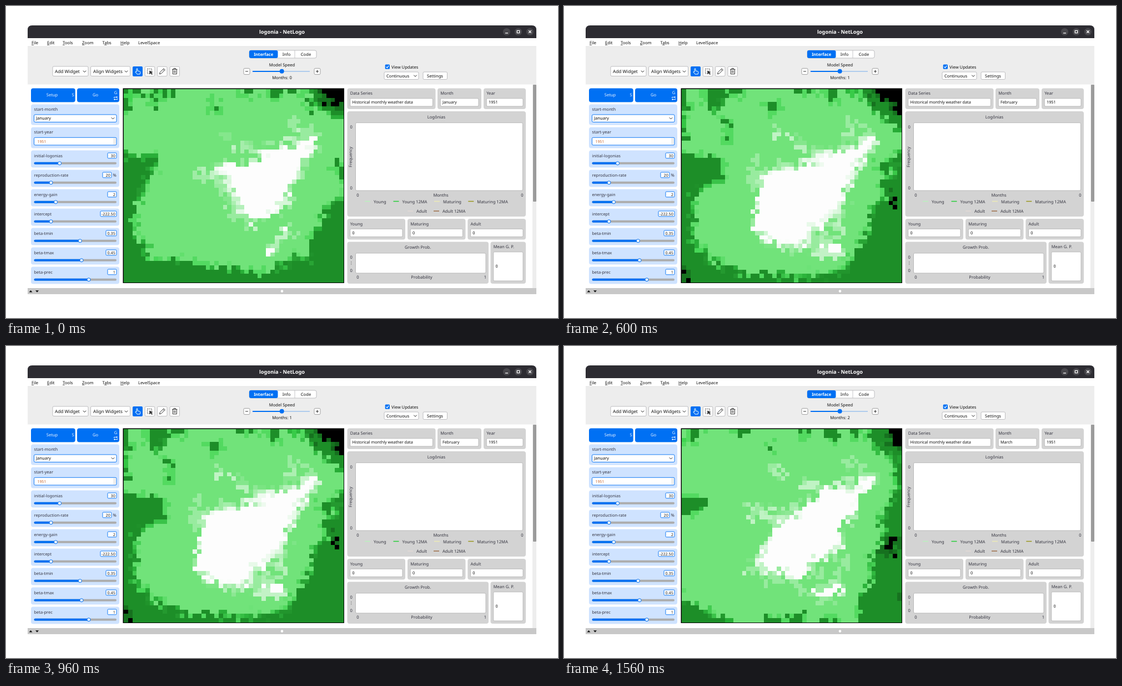
Write an HTML page with a canvas that moves like this. It is 994 px wide and 563 px high and loops after 1800 ms.

```html
<!DOCTYPE html>
<html lang="en">
<head>
<meta charset="utf-8">
<title>logonia</title>
<style>
  html, body { margin: 0; width: 100%; height: 100%; overflow: hidden; background: #fff; }
  svg { position: absolute; left: 0; top: 0; }
  text { font: 7.6px "Noto Sans", sans-serif; fill: #353540; text-rendering: geometricPrecision; white-space: pre; }
  #map { position: absolute; left: 212px; top: 150px; width: 396px; height: 349px; image-rendering: pixelated; }
</style>
</head>
<body>
<svg id="ui" width="994" height="563"></svg>
<canvas id="map" width="51" height="45"></canvas>
<script>
const BLUE = '#0070f3', GREY = '#d3d3d3', SKY = '#cfe3ff', INK = '#111';
const parts = [];
const add = markup => parts.push(markup);

// Boxes are given by their edges: left, top, right, bottom.
const box = (l, t, r, b, fill = '#fff', stroke = 'none', radius = 2) =>
  add(`<rect x="${l}" y="${t}" width="${r - l}" height="${b - t}" rx="${radius}" fill="${fill}" stroke="${stroke}" stroke-width=".9"/>`);
const path = (d, stroke, width = 1, fill = 'none', extra = '') =>
  add(`<path d="${d}" stroke="${stroke}" stroke-width="${width}" fill="${fill}" ${extra}/>`);
const circle = (x, y, r, fill, stroke = 'none') =>
  add(`<circle cx="${x}" cy="${y}" r="${r}" fill="${fill}" stroke="${stroke}"/>`);
const text = (x, y, s, { anchor = 'start', style = '', attrs = '' } = {}) =>
  add(`<text x="${x}" y="${y}" text-anchor="${anchor}" style="${style}" ${attrs}>${s}</text>`);
const centred = (x, y, s, style, attrs) => text(x, y, s, { anchor: 'middle', style, attrs });
const chevron = (x, y) => path(`M${x - 2.7} ${y - 1.3}l2.7 2.7 2.7-2.7`, '#222');

function drawWindow() {
  path('M39 520V43q0-8 8-8H947q8 0 8 8V520z', 'none', 0, '#fff');
  path('M39 58V43q0-8 8-8H947q8 0 8 8V58z', 'none', 0, '#2d2c32');
  centred(497, 49.8, 'logonia - NetLogo', 'font-size:9.25px;font-weight:bold;fill:#fff');
  for (const x of [901.5, 922.5, 943.5]) circle(x, 46.5, 6.6, '#48474c');
  path('M899 48.8h5M920.3 44.3h4.4v4.4h-4.4zM941.2 44.2l4.6 4.6m0-4.6l-4.6 4.6', '#fff', 1.3);
  const menu = [[46, '', 'F', 'ile'], [74, '', 'E', 'dit'], [102, '', 'T', 'ools'], [137, '', 'Z', 'oom'],
    [173.5, 'T', 'a', 'bs'], [206, '', 'H', 'elp'], [238, '', '', 'LevelSpace']];
  for (const [x, before, key, after] of menu)
    text(x, 68.8, `${before}<tspan text-decoration="underline">${key}</tspan>${after}`, { style: `fill:${INK}` });
  box(39, 73, 955, 141.5, '#ededed', 'none', 0);
  path('M39 73h916', '#ddd', .8);
  box(948, 141.5, 955, 509, '#ededed', 'none', 0);
  box(949, 142, 955, 353, '#9b9b9b', 'none', 1);
  box(39, 509, 955, 520, '#c8c8c8', 'none', 0);
  path('M41.5 516.5l3-3.5 3 3.5zM53 513.2h6l-3 3.5z', 'none', 0, '#111');
  circle(497, 514.6, 2.3, '#fff');
}

function drawToolbar() {
  const dark = `fill:${INK}`, line = '#b8b8bc';
  box(438, 80, 559, 94, '#fff', line, 3);
  box(438, 80, 489.5, 94, BLUE, 'none', 3);
  path('M520 80v14', line, .8);
  centred(463.7, 89.6, 'Interface', 'fill:#fff;font-weight:bold');
  centred(505, 89.6, 'Info', dark);
  centred(540, 89.6, 'Code', dark);

  const wide = 'font-size:8.2px;fill:#111';
  box(84, 109, 148, 126.5, '#fff', line);
  text(88, 120.8, 'Add Widget', { style: wide });
  chevron(141.5, 118);
  box(152.5, 109, 223.5, 126.5, '#fff', line);
  text(157, 120.8, 'Align Widgets', { style: wide });
  chevron(216.5, 118);

  box(228, 109, 246, 127, BLUE);
  for (const x of [250.3, 272.5, 295]) box(x, 109.3, x + 17.5, 126.7, '#fff', line);
  path('M235 119v-5.5q1-1.5 2 0v3.5l4 1q1 .3.9 1.5l-.7 3.5h-5.2l-3.2-4q.6-1.5 2.2 0z', '#fff');
  path('M254.5 113.5h8v4m-3.5 4.5h-4.5v-8.5', '#444', 1, 'none', 'stroke-dasharray="1.8 1.3"');
  path('M258.5 117l5.5 2.2-2.3 1 2 2.6-1.2.9-1.9-2.7-1.7 1.7z', '#333', .7, '#333');
  path('M276.5 122.8l.8-3.2 6.7-6.7 2.3 2.3-6.7 6.7zM282.5 114.3l2.3 2.3', '#333');
  path('M299 114.3h9.5m-6.5 0v-1.6h3.5v1.6m-5.3 0v8.5h7.2v-8.5m-4.7 2v4.5m2.2-4.5v4.5', '#333');

  centred(497, 109, 'Model Speed', dark);
  path('M497 118h50', '#9cc2ee', 1.4);
  path('M444 118h53', BLUE, 1.8);
  circle(496.7, 117.8, 4, BLUE);
  box(428, 112.5, 439, 123.5, '#fff', '#999');
  box(555, 112.5, 566, 123.5, '#fff', '#999');
  path('M431 118h5M558 118h5m-2.5-2.5v5', '#333');
  centred(497, 132, 'Months: 0', dark, 'id="months"');

  box(682.7, 105.5, 691, 113.8, BLUE, 'none', 1.5);
  path('M684.5 109.7l1.8 1.8 3-3.8', '#fff', 1.2);
  text(694, 112.5, 'View Updates', { style: dark });
  box(681, 119, 743, 132.5, '#fff', line);
  text(685, 128.6, 'Continuous', { style: dark });
  chevron(737, 126);
  box(751, 119, 794.5, 132.5, '#fff', line);
  centred(772.5, 128.6, 'Settings', dark);
}

function drawControls() {
  const pale = 'fill:#e6f1ff';
  box(45, 148.5, 124.7, 173.5, BLUE, 'none', 4);
  box(128, 148.5, 204, 173.5, BLUE, 'none', 4);
  centred(83, 163.3, 'Setup', pale);
  centred(161, 163.3, 'Go', pale);
  centred(120.5, 163.3, 'S', pale);
  centred(197.5, 159, 'G', pale);
  path('M194.5 166v-1.5h6m-1.5-1.5l1.5 1.5-1.5 1.5M200.5 167v1.5h-6m1.5-1.5l-1.5 1.5 1.5 1.5', '#fff', .9);

  box(45, 177.5, 204, 214.7, SKY, 'none', 4);
  text(50.5, 188.8, 'start-month');
  box(50.5, 196, 199, 209.5, '#fff', BLUE);
  text(54, 205.4, 'January', { style: `fill:${INK}` });
  chevron(192.5, 202.6);

  box(45, 218.7, 204, 256.5, SKY, 'none', 4);
  text(50.5, 230, 'start-year');
  box(50.5, 237.3, 199, 251, '#fff', BLUE);
  box(193, 238.5, 198, 250, '#eee', 'none', 1);
  text(56.5, 246.8, '1951', { style: 'font-size:6.8px;fill:#c5622a' });

  const sliders = [['initial-logonias', '30', 183, 96.5], ['reproduction-rate', '20', 174, 81], ['energy-gain', '2', 183, 89.5],
    ['intercept', '-222.50', 170, 81], ['beta-tmin', '0.35', 180, 133.3], ['beta-tmax', '0.45', 180, 136], ['beta-prec', '1', 183, 149]];
  sliders.forEach(([name, value, left, knob], i) => {
    const y = 260.5 + 35 * i, right = i === 1 ? 190 : 199;
    box(45, y, 204, y + 31, SKY, 'none', 4);
    text(50.5, y + 12, name, { style: 'font-size:7.45px' });
    box(left, y + 4.5, right, y + 14.3, '#fff', BLUE, 1.5);
    text(right - 2.2, y + 12, value, { anchor: 'end', style: 'font-size:7.2px;fill:#222' });
    if (i === 1) text(192.5, y + 12, '%');
    box(50.5, y + 21.3, 199, y + 25.2, '#adadad');
    box(50.5, y + 21.3, knob, y + 25.2, BLUE);
    circle(knob, y + 23.3, 3, '#fff', BLUE);
  });
}

function drawMonitor(l, t, r, b, label, value, id = '') {
  box(l, t, r, b, GREY, 'none', 4);
  text(l + 5.2, t + 11.6, label);
  box(l + 5.2, t + 18.3, r - 5, b - 5, '#fff', '#b5b5b5');
  text(l + 9, (t + b + 13.3) / 2 + 2.5, value, { style: 'font-size:7.25px;fill:#111', attrs: id && `id="${id}"` });
}

function drawOutputs() {
  drawMonitor(614.5, 148.5, 773.5, 186, 'Data Series', 'Historical monthly weather data');
  drawMonitor(777, 148.5, 856, 186, 'Month', 'January', 'month');
  drawMonitor(860, 148.5, 936, 186, 'Year', '1951');
  drawMonitor(614.5, 384, 719, 421.5, 'Young', '0');
  drawMonitor(723, 384, 827.5, 421.5, 'Maturing', '0');
  drawMonitor(831.3, 384, 936, 421.5, 'Adult', '0');
  drawMonitor(872.5, 425.5, 936, 501, 'Mean G. P.', '0');

  box(614.5, 190, 936, 380, GREY, 'none', 4);
  centred(775, 203, 'Logônias');
  box(629.5, 210.7, 930.5, 333, '#fff', '#b5b5b5');
  centred(621.7, 220.5, '0');
  centred(621.7, 330.8, '0');
  centred(0, 0, 'Frequency', '', 'transform="translate(623 272.5) rotate(-90)"');
  centred(633.3, 343.6, '0');
  centred(783, 343.6, 'Months');
  centred(929.5, 343.6, '0');
  const legend = [[646, 352.5, '#b9f0bd', 'Young'], [697.5, 352.5, '#24cc37', 'Young 12MA'], [771, 352.5, '#ecebb4', 'Maturing'],
    [832.3, 352.5, '#98951c', 'Maturing 12MA'], [723, 370, '#e2dad5', 'Adult'], [770, 370, '#9d6e48', 'Adult 12MA']];
  for (const [x, y, colour, label] of legend) {
    path(`M${x} ${y}h10`, colour, 1.5);
    text(x + 16, y + 3, label);
  }

  box(614.5, 425.5, 869, 501, GREY, 'none', 4);
  centred(741.7, 438.3, 'Growth Prob.');
  box(629.5, 446, 864, 482, '#fff', '#b5b5b5');
  centred(621.7, 456, '0');
  centred(621.7, 479.6, '0');
  path('M621.7 461v6', '#555', 1, 'none', 'stroke-dasharray="1 1.4"');
  centred(633.3, 492.4, '0');
  centred(748.5, 492.4, 'Probability');
  centred(863, 492.4, '1');
  box(210.5, 148.5, 609, 500, '#000', 'none', 0);
}

drawWindow();
drawToolbar();
drawControls();
drawOutputs();
document.getElementById('ui').innerHTML = parts.join('');

// Land regions, in patches; wisps are stroked, the others filled.
const months = [
  { name: 'January',
    wisps: 'M25 13l3 1 4 .5M24 10.5v1M39 7v2M42 8v3M41 9l-3 3M17 17v2l3 .5M18 20l5 1M21 22h4M22 24h3M24 26l2 1M25 29h2M39 32l-3 3-2 3M36 34l2-1M38 25v2M29 12v1',
    snow: 'M45.8 11 43 11 42 12 39 13 36 14 32.6 14 32 16 30 17 29 18 24 18 20.6 18.3 21 19.3 24 20 25 21 24.5 23 25.8 24 25 25 27 26 26.5 28 28 29 30 29 29 31 29 32 30 32 31 30 33 30 36 28.5 36.5 26 38 25 38 22 40 21 42 18 42 15.2 43.5 14.4 44 13zM33 37h3v1h-3zM38 32h1v1h-1z',
    forest: 'M0 0H4V1H1V5L0 7zM7 0h1v4H7zM9 0h2v1H9zM20 3h2v2h-2zM27 0h2v1h-2zM33 0h3v2h-3zM39 0h2v1h-2zM43 0 51 0 51 6.5 48 6.5 45 4 44 2zM0 15.5H8V17L7 18 6 20 5 22 4 24 3 27 2 28 2 32 3 35 5 37 6 40 13 40 15 41 20 41 21 42 24 42 26 41 28 43 34 43 37 41 40 39 42 40 44 37 44 33 46 31 47 27 51 25V45H0zM48 18h1v1h-1zM50 17h1v3h-1zM43 3h1v2h-1z',
    rock: 'M46 0H51V4H49V3H47V1H46z' },
  { name: 'February',
    wisps: 'M21 9h3M22.5 8v3M24 10l2 2 4 2M26 13l6 1.5M39 7v2M42 8v1M41 10l-4 2M15 20h5M17 16v3M16 22h3M21 18h5M38 26l-2 3M35 30l3 4M37 29l-2 6M33 31v6M30 35h4M24 38l5-.5M40 19v3',
    snow: 'M45 11 43 11 42 12.5 38 14 32.5 14.5 32 16 29 17 27 18 25 18 23 19 20 19 19 21 19 23 17 25 18 27 17 29 17 33 19 33.5 19 35.5 24 36 27 37 29 36 30 33 32 32 33 30 36 29 37 25 38.5 22 40 20 41 18 42 15.7 44 13.5zM31 37h6v1.3h-6zM35 36h2v1h-2z',
    forest: 'M0 0H1V5L0 8zM6 0 10 0 10 2 8 5 6 4zM10 7h1v6h-1zM0 9h1v3h-1zM12 0h2v1h-2zM20 3h2v2h-2zM27 0h2v1h-2zM33 0h3v2h-3zM38 0 51 0 51 10 48 7 45 5 43 3 42 1zM0 15 2 15 3 16 9 16 9 20 8 22 5.5 22 4 24 2 26 3 31 2 34 3 37 5.5 37 6 40 9 41 12 42 15 43 20 43 25 44 33 43 38 42 39 40 41 37 43 34 44 30 45 27 47 25 47 21 50 20 49 17 51 14V45H0zM46 17h2v2h-2z',
    rock: 'M45 0H51V5H50V4H48V2H45zM49 25h1v2h-1zM0 43h2v1H0z' },
  { name: 'March',
    wisps: 'M20 9h3M22 8v2l2 1M26 13.5h6M28 12l3 1M39 7v2M42 8v2M40 11l-3 2M15 18l12 1M15 20.5h9M17 17v4M20 22h3M13 33.5h6M17 31v2M18 34l3 1M19 35h4M27 36v3M30 34h3M36 33v4M39 20v2M35 31h3',
    snow: 'M45 11 43 11 42 12 38 13.5 32 14 32 16 29 17.4 27.5 18 27 20 24 21 22 22.5 21.6 24.5 19.7 26 20 27 18.5 28.6 17 31 18 32 20 33 24 33 26 35 28 35 30 32 30.5 30 33 30 36 28.4 37 26 36.5 22.6 38 21 40 19.6 41 17.4 42 15 44 13zM31 37 35 37 35 36 37 36 37 38 34 39 31 39z',
    forest: 'M2 0H5V1L3 3H2zM0 2h1v1H0zM13 0h2v1h-2zM20 3h1v1h-1zM27 0h2v2h-2zM33 0h3v2h-3zM39 0h3v1h-3zM43 0 51 0 51 8 48 6 45 4 44 2zM0 16H5L6 17 4 19H0zM49 9h2v2h-2zM51 13 51 45 41 45 41 39 44 36 45 32 44 30 46 27 47 24 46 22 48 18 49 16zM0 39 3 40 4 42 7 43 9 44 12 45 0 45zM20 44h3v1h-3zM25 43h3v2h-3zM33 44h3v1h-3zM50 11h1v2h-1z',
    rock: 'M48 0H51V4H49V2H48zM47 27h2v2h-2zM49 25h1v2h-1zM50 38h1v1h-1z' }
];

const map = document.getElementById('map').getContext('2d', { willReadFrequently: true });
const W = 51, H = 45;

function makeTerrain({ wisps, snow, forest, rock }, seed) {
  const random = () => (seed = seed * 16807 % 2147483647) / 2147483647;
  const region = (d, fill, edge) => {
    const shape = new Path2D(d);
    map.lineWidth = .8;
    map.strokeStyle = edge;
    map.stroke(shape);
    map.fillStyle = fill;
    map.fill(shape);
  };
  map.fillStyle = '#71e37a';
  map.fillRect(0, 0, W, H);
  map.lineWidth = 1;
  map.strokeStyle = '#c0f3c4';
  map.stroke(new Path2D(wisps));
  region(snow, '#fdfdfd', '#d2f6d5');
  region(forest, '#1d8e28', '#28cc3b');
  region(rock, '#000', '#0e4714');

  // Ragged borders: some patches copy a neighbour.
  const smooth = map.getImageData(0, 0, W, H), ragged = map.createImageData(W, H);
  const near = (value, limit) => Math.min(limit - 1, Math.max(0, value + Math.round((random() - .5) * 1.7)));
  for (let y = 0; y < H; y++) for (let x = 0; x < W; x++) {
    const from = 4 * (near(y, H) * W + near(x, W));
    ragged.data.set(smooth.data.subarray(from, from + 4), 4 * (y * W + x));
  }
  return ragged;
}

const terrains = months.map((month, i) => makeTerrain(month, 4211 + i));
const monthsLabel = document.getElementById('months'), monthLabel = document.getElementById('month');
let shown = -1;

function tick() {
  const current = Math.floor(performance.now() % 1800 / 600);
  if (current !== shown) {
    shown = current;
    map.putImageData(terrains[current], 0, 0);
    monthsLabel.textContent = `Months: ${current}`;
    monthLabel.textContent = months[current].name;
  }
  requestAnimationFrame(tick);
}
tick();
</script>
</body>
</html>
```
